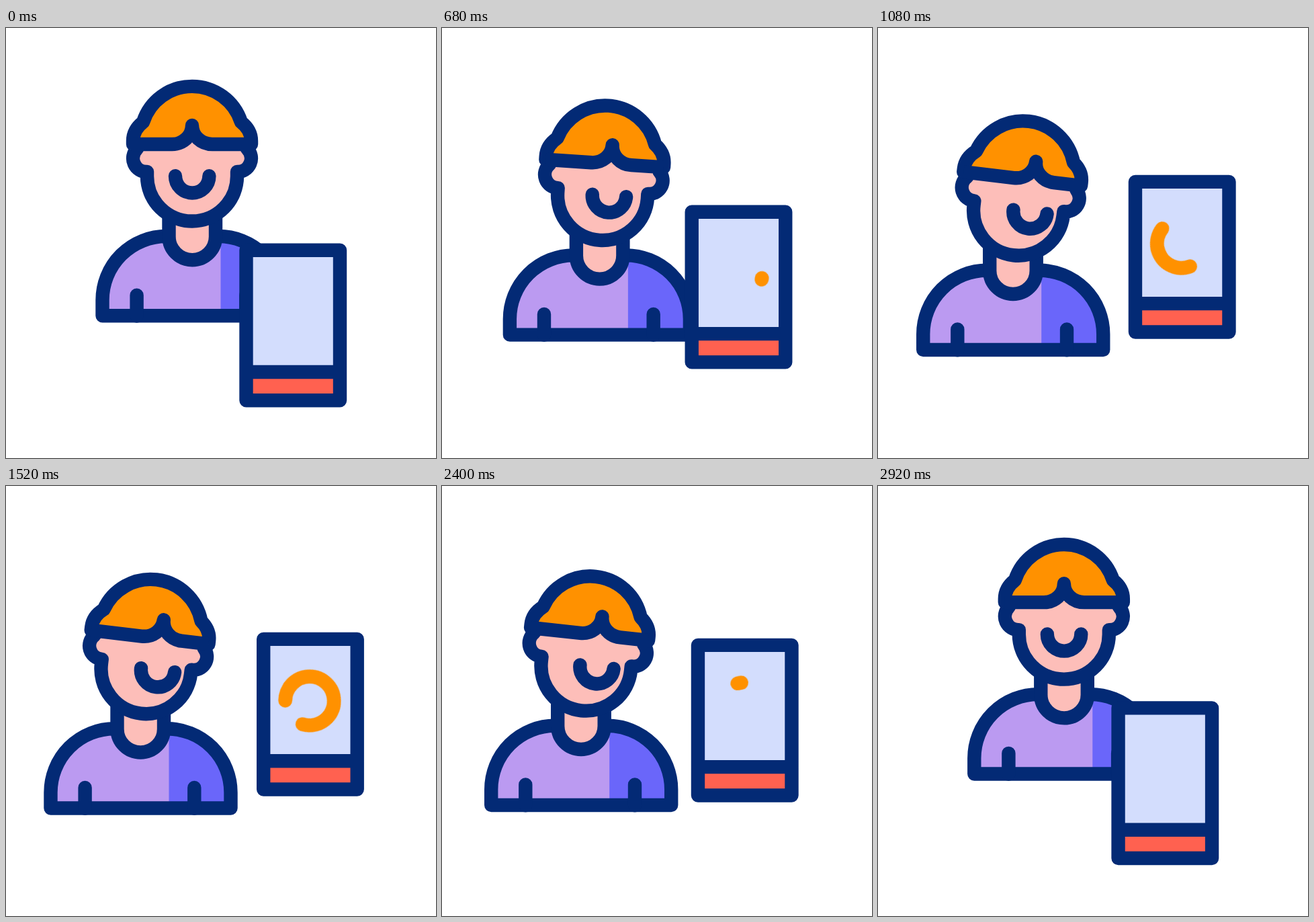
Write an HTML page that moves like this. It is 640 px wide and 640 px high and loops after 3 s.

```html
<!DOCTYPE html>
<html lang="en">
<head>
<meta charset="utf-8">
<title>Person and phone</title>
<style>
  /* --move: 0 = overlapping, 1 = apart; --head and --tail: spinner ends in degrees */
  @property --move { syntax: "<number>"; inherits: true; initial-value: 0; }
  @property --head { syntax: "<number>"; inherits: true; initial-value: 0; }
  @property --tail { syntax: "<number>"; inherits: true; initial-value: 0; }

  html, body { margin: 0; width: 100%; height: 100%; overflow: hidden; background: #fff; }

  svg {
    display: block; width: 100%; height: 100%;
    fill: none; stroke: #032a75; stroke-width: 20.4;
    stroke-linecap: round; stroke-linejoin: round;
    animation: move 3s cubic-bezier(.55, 0, .15, 1) infinite;
  }
  .fill { stroke: none; }
  .skin { fill: #fdbeb9; }
  .hair { fill: #ff9100; }
  .shirt { fill: #bb9af1; }
  .shade { fill: #6a66fa; }
  .screen { fill: #d3ddfd; }
  .bar { fill: #ff6150; }

  .person { transform: translate(calc(var(--move) * -77px), calc(var(--move) * 51.2px)); }
  .phone { transform: translate(calc(var(--move) * 25.7px), calc(var(--move) * -102.8px)); }
  .face { transform: rotate(calc(var(--move) * 6.8deg)); transform-origin: 277px 292px; }
  .look { transform: translateX(calc(var(--move) * 17.5px)); }

  .spinner {
    stroke: #ff9100; stroke-width: 20.8;
    transform-origin: 426.2px 422.7px;
    stroke-dasharray: calc((var(--head) - var(--tail)) * 1px) 900px;
    stroke-dashoffset: calc(var(--tail) * -1px);
    animation: 3s cubic-bezier(.55, 0, .15, 1) infinite;
    animation-name: turn, head, tail, show;
    animation-timing-function: linear, cubic-bezier(.55, 0, .15, 1), cubic-bezier(.55, 0, .15, 1), step-end;
  }

  @keyframes move {
    0%, 11.03% { --move: 0; }
    39.9%, 74.67% { --move: 1; }
    99.17%, 100% { --move: 0; }
  }
  @keyframes turn {
    from { transform: rotate(-90deg); }
    to { transform: rotate(351.9deg); }
  }
  @keyframes head {
    0%, 18.6% { --head: 0; }
    66.7%, 100% { --head: 360; }
  }
  @keyframes tail {
    0%, 36.8% { --tail: 0; }
    91.8%, 100% { --tail: 360; }
  }
  @keyframes show {
    0% { visibility: hidden; }
    19.2% { visibility: visible; }
    91.4%, 100% { visibility: hidden; }
  }
</style>
</head>
<body>
<svg viewBox="0 0 640 640">
  <clipPath id="brow"><rect x="189" y="60" width="176" height="160"/></clipPath>

  <g class="person">
    <path class="fill shirt" d="M143.5 428V405A95 95 0 0 1 238.5 310H316.5A95 95 0 0 1 411.5 405V428Z"/>
    <path class="fill shade" d="M319.5 310A95 95 0 0 1 411.5 405V428H319.5Z"/>
    <path d="M242.5 310H238.5A95 95 0 0 0 143.5 405V428.3H411.5V405A95 95 0 0 0 316.5 310H312"/>
    <path d="M194.6 397.7V428.6M357.3 397.7V428.6"/>
    <path class="skin" stroke-linecap="butt" d="M242.5 274V310.5A34.75 34.75 0 0 0 312 310.5V274"/>

    <g class="face">
      <path class="fill skin" d="M200 172H354V182H200Z"/>
      <path class="skin" d="M194.9 179.9A20 20 0 0 0 210 214V220.5A67 67 0 0 0 344 220.5V214A20 20 0 0 0 359.1 179.9"/>
      <path class="hair" d="M189 173V168C189 156 195 147 204 140A76.7 76.7 0 0 1 350 140C359 147 365 156 365 168V173"/>
      <g clip-path="url(#brow)">
        <path class="skin look" d="M140 173H247A30 28 0 0 0 277 145A30 28 0 0 0 307 173H414"/>
      </g>
      <path class="look" d="M252 220.3A25.2 25.2 0 0 0 302.4 220.3"/>
    </g>
  </g>

  <g class="phone">
    <path class="fill screen" d="M357.5 330.7H497V512H357.5Z"/>
    <path class="fill bar" d="M357.5 512H497V554.3H357.5Z"/>
    <path d="M357.5 330.7H497V554.3H357.5ZM357.5 512H497"/>
    <circle class="spinner" cx="426.2" cy="422.7" r="36.3" pathLength="360"/>
  </g>
</svg>
</body>
</html>
```
